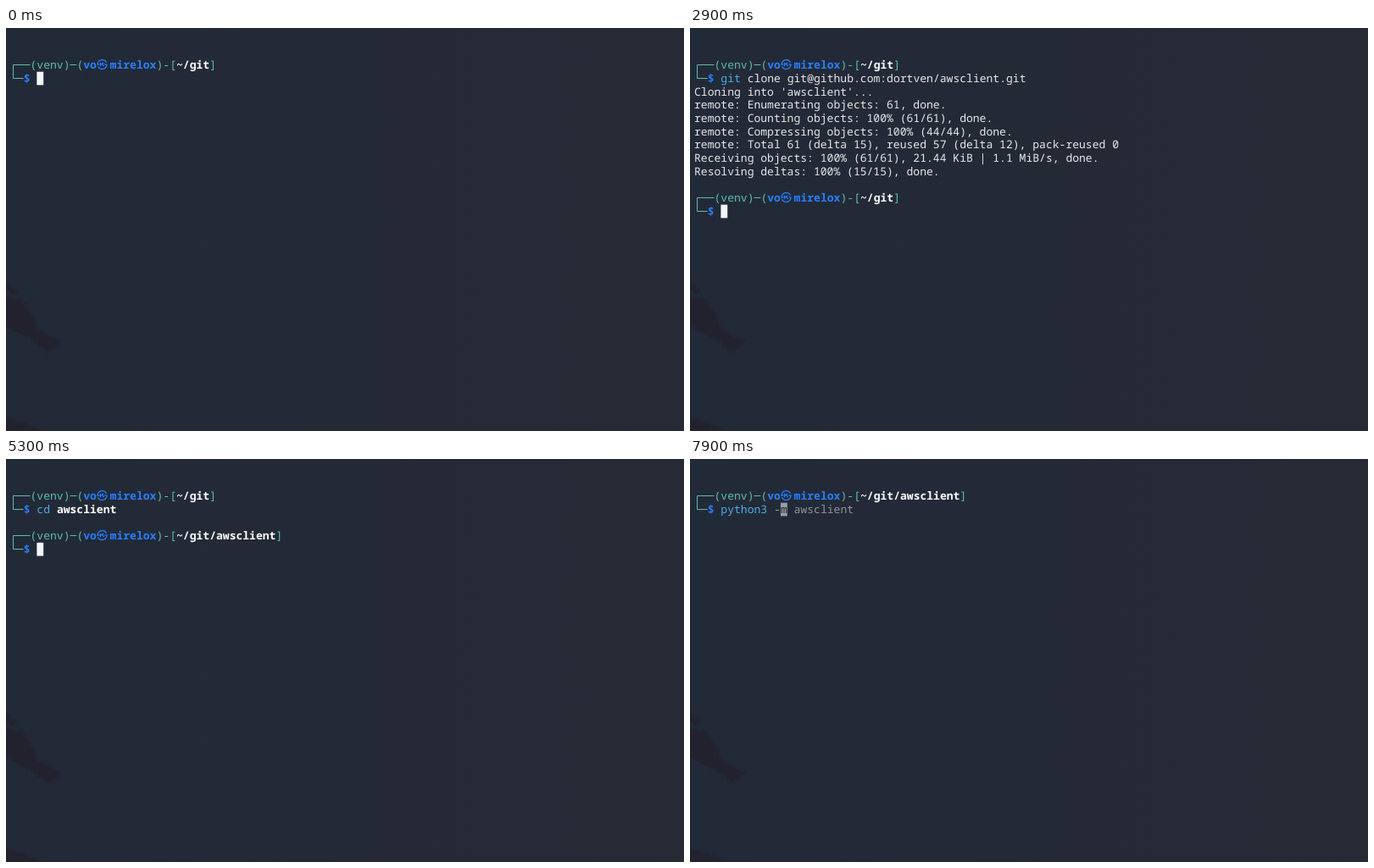
Write an HTML page that moves like this. It is 800x476 px and loops after 8000 ms.

```html
<!DOCTYPE html>
<html lang="en">
<head>
<meta charset="utf-8">
<title>Terminal session</title>
<style>
  html, body { margin: 0; width: 100%; height: 100%; overflow: hidden; background: #242936; }
  svg { display: block; width: 100vw; height: 100vh; }
  text {
    font: 13.067px "Noto Sans Mono", "DejaVu Sans Mono", monospace;
    font-variant-ligatures: none; text-rendering: geometricPrecision;
    white-space: pre; fill: #e6e8ea;
  }
  .frame { fill: #5ebdab; }
  .user { fill: #277fff; font-weight: 700; }
  .seal { fill: #277fff; font-family: "Noto Sans CJK KR", "Noto Sans CJK JP", "Noto Sans CJK", sans-serif; font-weight: 700; }
  .path { fill: #fff; font-weight: 700; }
  .cmd { fill: #49aee6; }
  .option { fill: #5ebdab; }
  .unknown { text-decoration: underline; }
  .hint { fill: #8f9299; }
  .under { fill: #242936; }
  .rule { fill: none; stroke: #5ebdab; stroke-width: 1; }
</style>
</head>
<body>
<svg viewBox="0 0 800 476" preserveAspectRatio="none">
  <defs>
    <linearGradient id="backdrop">
      <stop offset="0" stop-color="#222a37"/>
      <stop offset=".45" stop-color="#242936"/>
      <stop offset="1" stop-color="#262a35"/>
    </linearGradient>
    <filter id="soft"><feGaussianBlur stdDeviation=".8"/></filter>
  </defs>
  <rect width="800" height="476" fill="url(#backdrop)"/>
  <g fill="#23232d" filter="url(#soft)">
    <path d="M-3 300L4 303L13 313L7 314L-3 308Z"/>
    <path d="M-3 319L18 320L27 333L36 350L34 353L50 364L66 370L50 383L27 365L-3 350Z"/>
    <path d="M-3 459L20 466L43 477H-3Z"/>
  </g>
  <g id="screen"></g>
</svg>
<script>
const LOOP = 8000, CELL_W = 7.84, CELL_H = 15.7, LEFT = 5, TOP = 4.6, BASE = 12.1;
const NS = 'http://www.w3.org/2000/svg';
const screen = document.getElementById('screen');

const CLONE = 'git clone git@github.com:dortven/awsclient.git';
const CD = 'cd awsclient';
const RUN = 'python3 -m awsclient';
const REPO = '~/git/awsclient';
const CLONING = "Cloning into 'awsclient'...";
const FETCH = [
  'remote: Enumerating objects: 61, done.',
  'remote: Counting objects: 100% (61/61), done.'
];
const COMPRESSED = 'remote: Compressing objects: 100% (44/44), done.';
const TOTAL = 'remote: Total 61 (delta 15), reused 57 (delta 12), pack-reused 0';
const RECEIVED = 'Receiving objects: 100% (61/61), 21.44 KiB | 1.1 MiB/s, done.';
const RESOLVED = 'Resolving deltas: 100% (15/15), done.';

const colX = col => LEFT + col * CELL_W;
const rowY = row => TOP + row * CELL_H;

function add(tag, attrs, content = '') {
  const node = document.createElementNS(NS, tag);
  for (const key in attrs) node.setAttribute(key, attrs[key]);
  node.textContent = content;
  screen.append(node);
}

function put(row, col, content, style = '') {
  if (content) add('text', { x: colX(col), y: rowY(row) + BASE, class: style }, content);
}

function cursor(row, col, under = '', fill = '#f4f7fa') {
  add('rect', { x: colX(col), y: rowY(row), width: CELL_W, height: CELL_H, fill });
  put(row, col, under, 'under');
}

function prompt(row, dir = '~/git') {
  const y = Math.floor(rowY(row) + CELL_H / 2) + .5;
  const y2 = Math.floor(rowY(row + 1) + CELL_H / 2) + .5;
  const x = Math.floor(colX(.5)) + .5;
  add('path', { class: 'rule', d: `M${colX(3)} ${y}H${x}V${y2}H${colX(2)}M${colX(9)} ${y}H${colX(10)}` });
  put(row, 3, '(venv)', 'frame');
  put(row, 10, '(', 'frame');
  put(row, 11, 'vo', 'user');
  put(row, 13, '㉿', 'seal');
  put(row, 15, 'mirelox', 'user');
  put(row, 22, ')-[', 'frame');
  put(row, 25, dir, 'path');
  put(row, 25 + dir.length, ']', 'frame');
  put(row + 1, 2, '$', 'user');
}

// Command line with syntax colours and a grey suggestion after the typed part.
function input(row, line, typed = line.length, showCursor = true) {
  const text = line.slice(0, typed);
  const word = text.split(' ')[0];
  const known = ['git', 'cd', 'python', 'python3'].includes(word);
  const args = text.slice(word.length);
  const argStyle = line === CD && typed === CD.length ? 'path' : line === RUN ? 'option' : '';
  put(row, 4, word, known ? 'cmd' : 'unknown');
  if (args.trim()) put(row, 5 + word.length, args.slice(1), argStyle);
  const next = typed ? line.slice(typed) : '';
  put(row, 5 + typed, next.slice(1), 'hint');
  if (showCursor) cursor(row, 4 + typed, next[0], next ? '#999da5' : undefined);
}

function emptyPrompt(row, dir) {
  prompt(row, dir);
  cursor(row + 1, 4);
}

function cloneScene(t) {
  prompt(2);
  const typed = t < 1000 ? Math.floor(t / 100) : t < 1100 ? 10 : CLONE.length;
  input(3, CLONE, typed, t < 1400);
  if (t < 1400) return;
  if (t < 1500) return cursor(4, 0);
  const lines = [CLONING];
  if (t >= 2500) lines.push(...FETCH);
  if (t >= 2600) lines.push(COMPRESSED, TOTAL);
  if (t >= 2700) lines.push(RECEIVED);
  if (t >= 2800) lines.push(RESOLVED);
  lines.forEach((line, i) => put(4 + i, 0, line));
  if (t >= 2900) return emptyPrompt(12);
  if (t >= 2500 && t < 2600) put(7, 0, 'remote: Compressing objects:  15% (7/44)');
  cursor(4 + lines.length, 0, t >= 2500 && t < 2600 ? 'r' : '');
}

function cdScene(t) {
  prompt(2);
  const typed = t < 4000 ? 0 : t < 4600 ? Math.min(4, Math.floor((t - 3900) / 100)) : CD.length;
  input(3, CD, typed, t < 4800);
  if (t >= 4900) emptyPrompt(5, REPO);
  else if (t >= 4800) cursor(4, 0);
}

function runScene(t) {
  prompt(2, REPO);
  const keys = [6000, 6200, 6900, 7200, 7300, 7400, 7600, 7700, 7900];
  input(3, RUN, keys.filter(key => t >= key).length);
}

function draw(t) {
  screen.replaceChildren();
  if (t < 3100) cloneScene(t);
  else if (t < 3400) emptyPrompt(0);
  else if (t < 3500) cursor(0, 0);
  else if (t < 5600) cdScene(t);
  else if (t < 5700) emptyPrompt(0, REPO);
  else if (t < 5800) cursor(0, 0);
  else runScene(t);
}

const start = performance.now();
let shown = -1;
function tick() {
  const step = Math.floor((performance.now() - start) % LOOP / 100);
  if (step !== shown) draw((shown = step) * 100);
  requestAnimationFrame(tick);
}
tick();
</script>
</body>
</html>
```
